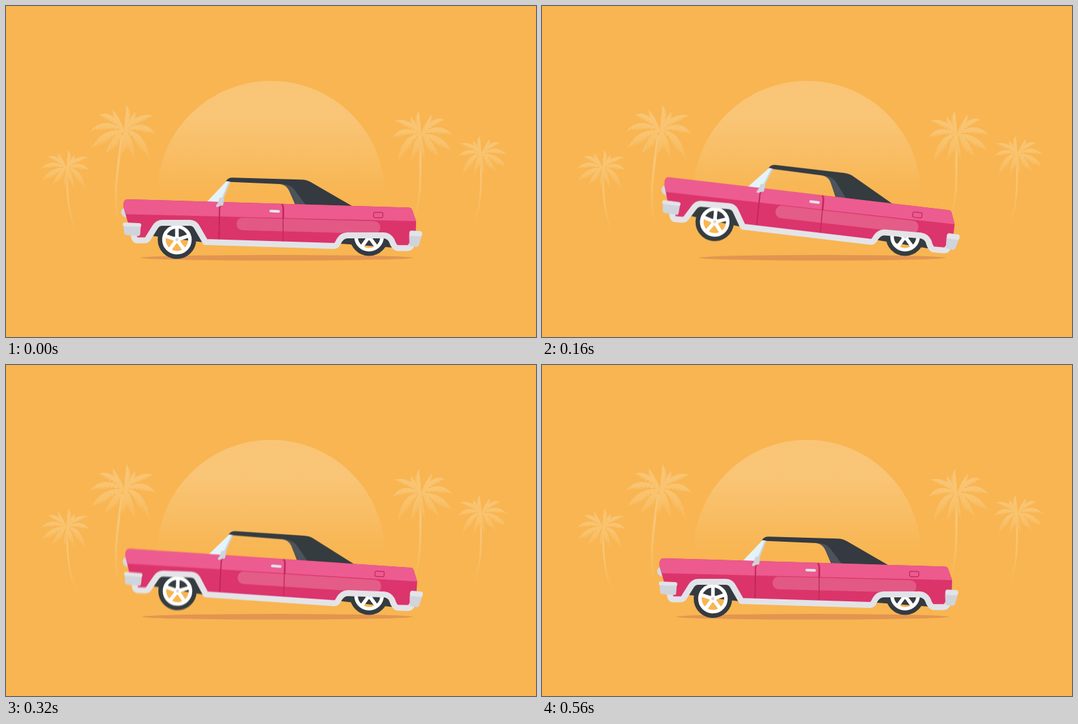
An HTML page for the animation above (680 ms loop, 800 by 500 pixels).

```html
<!DOCTYPE html>
<html lang="en">
<head>
<meta charset="utf-8">
<title>Lowrider</title>
<style>
  html, body { margin: 0; width: 100%; height: 100%; overflow: hidden; background: #f8b551; }
  svg { display: block; width: 800px; height: 500px; }
  .tilt { transform: rotate(var(--a)); transform-origin: 567px 371px; }
  #shadow { transform-origin: 561px 380px; }
  #blur { isolation: isolate; }
  #blur use { mix-blend-mode: plus-lighter; }
</style>
</head>
<body>
<svg viewBox="0 0 800 500">
  <defs>
    <linearGradient id="sun" gradientUnits="userSpaceOnUse" x1="0" y1="170" x2="0" y2="286">
      <stop stop-color="#fff" stop-opacity=".21"/>
      <stop offset="1" stop-color="#fff" stop-opacity="0"/>
    </linearGradient>
    <linearGradient id="leaf" gradientUnits="userSpaceOnUse" x1="0" y1="-38" x2="0" y2="52">
      <stop stop-color="#f9c677"/>
      <stop offset=".5" stop-color="#f9c36f"/>
      <stop offset="1" stop-color="#f8b859"/>
    </linearGradient>
    <linearGradient id="bark" x1="0" y1="0" x2="0" y2="1">
      <stop offset=".3" stop-color="#f9c677"/>
      <stop offset="1" stop-color="#f8b551"/>
    </linearGradient>

    <g id="wheel" fill="none" stroke="#fff">
      <circle r="25.3" stroke="#343a40" stroke-width="7.4"/>
      <circle r="19.6" stroke-width="5.4"/>
      <path stroke-width="5.4" d="M0,0V-19M0,0L18.1-5.9M0,0L11.2,15.4M0,0L-11.2,15.4M0,0L-18.1-5.9"/>
      <circle r="5.5" fill="#fff" stroke="none"/>
      <circle r="2.4" fill="#d5d8de" stroke="none"/>
    </g>

    <g id="car">
      <g class="tilt">
        <path fill="#343a40" d="M211,346 229,328H285L299,357 286,355.500Z M504,359 514,347H576L585,365Z"/>
        <use href="#wheel" x="258" y="353"/>
      </g>
      <use href="#wheel" x="548" y="348.500"/>
      <g class="tilt">
        <path fill="#343a40" d="M332,264.500Q335,259.300 342,259.300L446,262.300Q454,262.500 460,266L523,302.500 437,301 427,278Q423,270 414,269L333,265.500Z"/>
        <path fill="#4b535b" d="M414,269Q428,269 434,276 439,282 453,301.500L438,301 427,278Q423,270 414,269Z"/>
        <path fill="#e4f3f9" d="M302,297 333,264.500 338,265.500 325,297Z"/>
        <path fill="#cfd4dc" d="M336,265.500H338.500L326,297H323Z"/>
        <path fill="#d5d8de" d="M182,305Q174,304.500 173.500,311 174,318 183,320.500Z"/>
        <path fill="#db346a" d="M184,292 608,304.500Q612,304.700 613,308L619,325 618.500,342 610,366 588,365 578,347H512L498,362.500 301,356.500 284,327.500H232L215,354H194L184,327 177.500,304V298Q178,292 184,292Z"/>
        <path fill="#ec5a8e" d="M184,292 608,304.500Q612,304.700 613,308L619,325 181,314.500 177.500,304V298Q178,292 184,292Z"/>
        <rect x="348" y="319.500" width="217" height="19" rx="9" fill="#fff" opacity=".18" transform="rotate(1.5 348 329)"/>
        <g fill="none" stroke="#c0285a" stroke-width="2">
          <path d="M326,300Q322.500,301 322.300,307L321.500,353"/>
          <path d="M416,299.500Q418.500,301 418.500,306V321" stroke-width="2.600"/>
          <path d="M418.300,320V356" stroke-width="1.400"/>
          <rect x="554.800" y="311.800" width="14" height="8" rx="2.500" stroke-width="1.200" transform="rotate(1.700 562 316)"/>
        </g>
        <path stroke="#e3e4e9" stroke-width="4" stroke-linecap="round" d="M399.500,309.700 411.500,310.200"/>
        <path fill="#cfd2d9" d="M322,290 327,289Q329.500,289 329,292L328,300Q327.500,302 325,301.500L319,303.800Q316,303.500 317.500,300.500L320,297Z"/>
        <path fill="none" stroke="#e1e3e8" stroke-width="9" stroke-linejoin="round" stroke-linecap="round"
          d="M193,347Q194,354 198,354H209Q213,354 215,350L225,334Q229,327.500 236,327.500H277Q284,327.500 287.500,333L301,356.500 495,362.500Q499,362.500 501,358 506,346.500 516,346.500H570Q578,347 582,354 586,365.500 591,365.700H606Q611,365.500 612,361"/>
        <path fill="#d0d3da" d="M177.500,332H203.500L202.500,345Q202.200,347.500 199.500,347.500L181,346Q178.500,345.800 178.200,343Z"/>
        <path fill="#e1e3e8" d="M179,327 201.500,328Q204.500,328.500 204.300,331.500 204,333.800 201.500,333.700L179,332.700Q176.300,332.500 176.300,330 176.500,327 179,327Z"/>
        <path fill="#d0d3da" d="M608.500,346 627.500,347 623.500,361Q622.500,364 619.500,363.800L609,362.500Z"/>
        <path fill="#e1e3e8" d="M612,339.300 625.500,340Q628.500,340.300 628.300,344 628,348 625,348L611,347.300Q608.500,347 608.700,343.500 609,339.300 612,339.300Z"/>
      </g>
    </g>
  </defs>

  <rect width="800" height="500" fill="#f8b551"/>
  <circle cx="400" cy="285" r="172" fill="url(#sun)"/>
  <g id="palms"></g>
  <ellipse id="shadow" cx="408.500" cy="380.300" rx="205.500" ry="4.200" fill="#e29550"/>
  <g id="blur"></g>
</svg>
<script>
const NS = 'http://www.w3.org/2000/svg';
const add = (parent, tag, attrs) => {
  const el = parent.appendChild(document.createElementNS(NS, tag));
  for (const k in attrs) el.setAttribute(k, attrs[k]);
  return el;
};
const $ = id => document.getElementById(id);

// Palm fronds from the hub: control point, tip, leaflet depth
const fronds = [
  [2, -20, 4, -38, 9], [-6, -18, -17, -31, 9], [8, -16, 17, -27, 9],
  [-20, -32, -38, -22, 10], [-30, -22, -51, 2, 12], [-34, -2, -49, 27, 15],
  [-18, 6, -29, 38, 14], [20, -28, 45, -21, 10], [32, -18, 47, 6, 12],
  [32, -2, 40, 48, 15], [14, 6, 17, 46, 13], [-2, 10, -7, 42, 13]
];

// Smooth spine out to the tip, toothed edge back on the hanging side
function frondPath([cx, cy, ex, ey, depth]) {
  const side = ex < 0 ? -1 : 1, n = 22;
  let d = `M0,0Q${cx},${cy} ${ex},${ey}`;
  for (let i = n; i > 0; i--) {
    const t = i / n, u = 1 - t;
    const x = 2 * u * t * cx + t * t * ex, y = 2 * u * t * cy + t * t * ey;
    const dx = u * cx + t * (ex - cx), dy = u * cy + t * (ey - cy);
    const w = depth * Math.sin(Math.PI * t ** 0.8) * (i % 2 ? 1 : 0.5) / Math.hypot(dx, dy);
    d += `L${(x - side * dy * w + dx * w * 0.5).toFixed(1)},${(y + side * dx * w + dy * w * 0.5).toFixed(1)}`;
  }
  return d + 'Z';
}

function palm(x, y, sx, sy, trunk) {
  add($('palms'), 'path', { d: trunk, fill: 'none', stroke: 'url(#bark)', 'stroke-width': 3.6 * sy });
  const g = add($('palms'), 'g', { transform: `translate(${x} ${y}) scale(${sx} ${sy})`, fill: 'url(#leaf)' });
  for (const f of fronds) add(g, 'path', { d: frondPath(f) });
}
palm(178, 187, 1, 1, 'M175,195C171,235 159,290 171,333');
palm(91, 244, 0.74, 0.72, 'M92,250C92,290 95,325 111,347');
palm(627, 193, -0.92, 0.94, 'M626,200C624,245 630,295 613,328');
palm(718, 223, -0.74, 0.72, 'M717,230C717,265 719,310 702,335');

// One entry per 40 ms step; the last pose rests until the loop ends
const STEP = 40, LOOP = 680, SAMPLES = 4, SHUTTER = 0.4;
const tilt = [0, 0.5, 1.95, 3.65, 5, 5.15, 4.85, 3.75, 2.15, 0.95, 0.3, -0.1, -0.2, -0.1, 0];
const width = [1, 0.994, 0.973, 0.935, 0.905, 0.9, 0.915, 0.957, 0.993, 1.008, 1.007, 1.003, 1.001, 1, 1];
const last = tilt.length - 1;
const cars = Array.from({ length: SAMPLES }, () => add($('blur'), 'use', { href: '#car' }));

function draw(time) {
  const i = Math.min(last, Math.floor(time % LOOP / STEP));
  const moving = i > 0 && i < last;
  const spread = moving ? (tilt[i + 1] - tilt[i - 1]) / 2 * SHUTTER : 0;
  cars.forEach((car, k) => {
    car.style.setProperty('--a', tilt[i] + spread * ((k + 0.5) / SAMPLES - 0.5) + 'deg');
    car.style.opacity = moving ? 1 / SAMPLES : k ? 0 : 1;
  });
  $('shadow').style.transform = `scaleX(${width[i]})`;
}

const start = performance.now();
function tick() {
  draw(performance.now() - start);
  requestAnimationFrame(tick);
}
tick();
</script>
</body>
</html>
```
